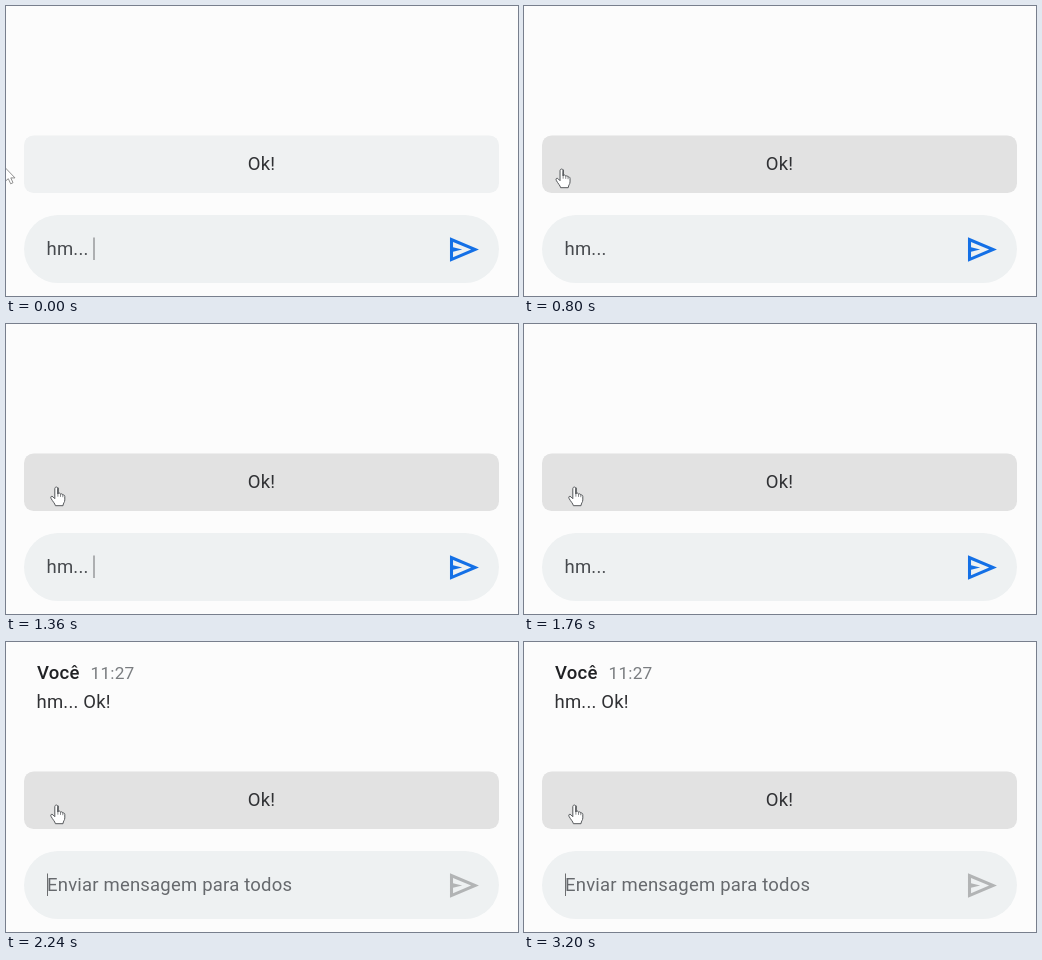
These frames come from a looping animation (512 px wide and 290 px high, 3240 ms). An HTML page:

```html
<!DOCTYPE html>
<html lang="pt-BR">
<head>
<meta charset="utf-8">
<title>Chat</title>
<style>
  html, body { margin: 0; width: 100%; height: 100%; overflow: hidden; background: #fcfcfc; }
  svg { display: block; width: 100vw; height: 100vh; }
  text { font: 400 18.5px Roboto, Arial, sans-serif; letter-spacing: .2px; white-space: pre; }
  .name { font-weight: 500; fill: #202124; }
  .time { font-size: 17.3px; fill: #7a7d80; }
  .caret { fill: #6c6e70; }
  .pointer { fill: #fff; stroke-linejoin: round; }
</style>
</head>
<body>
<svg viewBox="0 0 512 290">
  <rect width="512" height="290" fill="#fcfcfc"/>

  <g id="message">
    <text class="name" x="31" y="37">Você</text>
    <text class="time" id="time" x="84.5" y="37">11:27</text>
    <text id="body" x="30.5" y="66">hm... Ok!</text>
  </g>

  <rect id="reply" x="18" y="129.5" width="475" height="57.5" rx="9.5"/>
  <text x="255.6" y="164" text-anchor="middle" fill="#303134">Ok!</text>

  <rect x="18" y="209" width="475" height="68" rx="34" fill="#eef1f2"/>
  <text id="draft" x="40.5" y="249" fill="#46494d">hm...</text>
  <text id="hint" x="41" y="249" fill="#66696d">Enviar mensagem para todos</text>
  <rect id="caret" class="caret" y="231.5" width="1" height="22.5"/>

  <circle id="ripple" cx="459" cy="243" r="28" fill="#d2d4d4"/>
  <path id="send" transform="translate(439.4 225.2) scale(1.526)"
    d="M3 20V4l19 8-19 8zm2-3l11.85-5L5 7v3.5l6 1.5-6 1.5V17z"/>

  <path id="arrow" class="pointer" stroke="#858585" stroke-width=".9"
    d="M0 0V14L3.3 11.2L5.7 16.3L8 15.2L5.8 10.4H10Z"/>
  <g id="hand" class="pointer" stroke="#55585b" stroke-width="1">
    <path d="M-1.6 2C-1.6-.2 1.5-.2 1.5 2V7.2C2-5.9 1.5 6 1.5 7C2.2 5.8 4 6.2 4.1 7.6C4.8 6.7 6.3 7.1 6.4 8.4C7.2 7.8 8.4 8.4 8.4 9.8V13.2C8.4 15.6 6.8 16.2 6.6 19H-1C-1.4 16.8-3.9 14.6-5.4 11.6C-6.3 9.8-4.6 8.9-3.4 10.2L-1.6 12Z"/>
    <path fill="none" stroke-width=".7" d="M1.5 7V10M4.1 7.6V10.2M6.4 8.4V10.5"/>
  </g>
</svg>
<script>
  const LOOP = 3240, SENT = 1840, DELIVERED = 2080, HOVER = 520;
  const el = id => document.getElementById(id);
  const path = [[280, 0], [400, 8], [520, 19], [660, 29.5], [800, 37.6], [940, 42.8], [1080, 46.4], [1220, 49], [1360, 50.4]];

  const clamp = v => Math.min(1, Math.max(0, v));
  const ramp = (t, a, b) => clamp((t - a) / (b - a));
  const show = (id, on) => el(id).setAttribute('visibility', on ? 'visible' : 'hidden');
  const paint = (id, color) => el(id).setAttribute('fill', color);
  const mix = (a, b, k) => `rgb(${a.map((v, i) => Math.round(v + (b[i] - v) * k))})`;

  function pointerX(t) {
    const i = path.findIndex(p => p[0] > t);
    if (i === 0) return path[0][1];
    if (i < 0) return path[path.length - 1][1];
    const [a, x] = path[i - 1], [b, y] = path[i];
    return x + (y - x) * ramp(t, a, b);
  }

  function caretOn(t) {
    const start = t < SENT ? -60 : SENT;
    return Math.floor((t - start) / 500) % 2 === 0;
  }

  function render(t) {
    const x = pointerX(t), sent = t >= SENT, over = t >= HOVER;
    show('message', sent);
    show('time', t >= DELIVERED);
    paint('body', t >= DELIVERED ? '#303134' : '#a2a4a6');
    paint('reply', mix([239, 241, 242], [226, 226, 226], ramp(t, HOVER - 20, HOVER + 60)));

    show('draft', !sent);
    show('hint', sent);
    show('caret', caretOn(t));
    el('caret').setAttribute('x', sent ? 41 : 87.5);

    const glow = sent ? 1 - ramp(t, 1920, 2120) : 0;
    el('ripple').setAttribute('opacity', glow);
    paint('send', sent ? mix([178, 180, 181], [158, 160, 160], glow) : '#1470e6');

    show('arrow', !over);
    show('hand', over);
    el('arrow').setAttribute('transform', `translate(${x - 1} 161.5)`);
    el('hand').setAttribute('transform', `translate(${x} 162.7)`);
    if (t < DELIVERED) show('time', false);
  }

  const begin = performance.now();
  function tick() {
    render((performance.now() - begin) % LOOP);
    requestAnimationFrame(tick);
  }
  tick();
</script>
</body>
</html>
```
